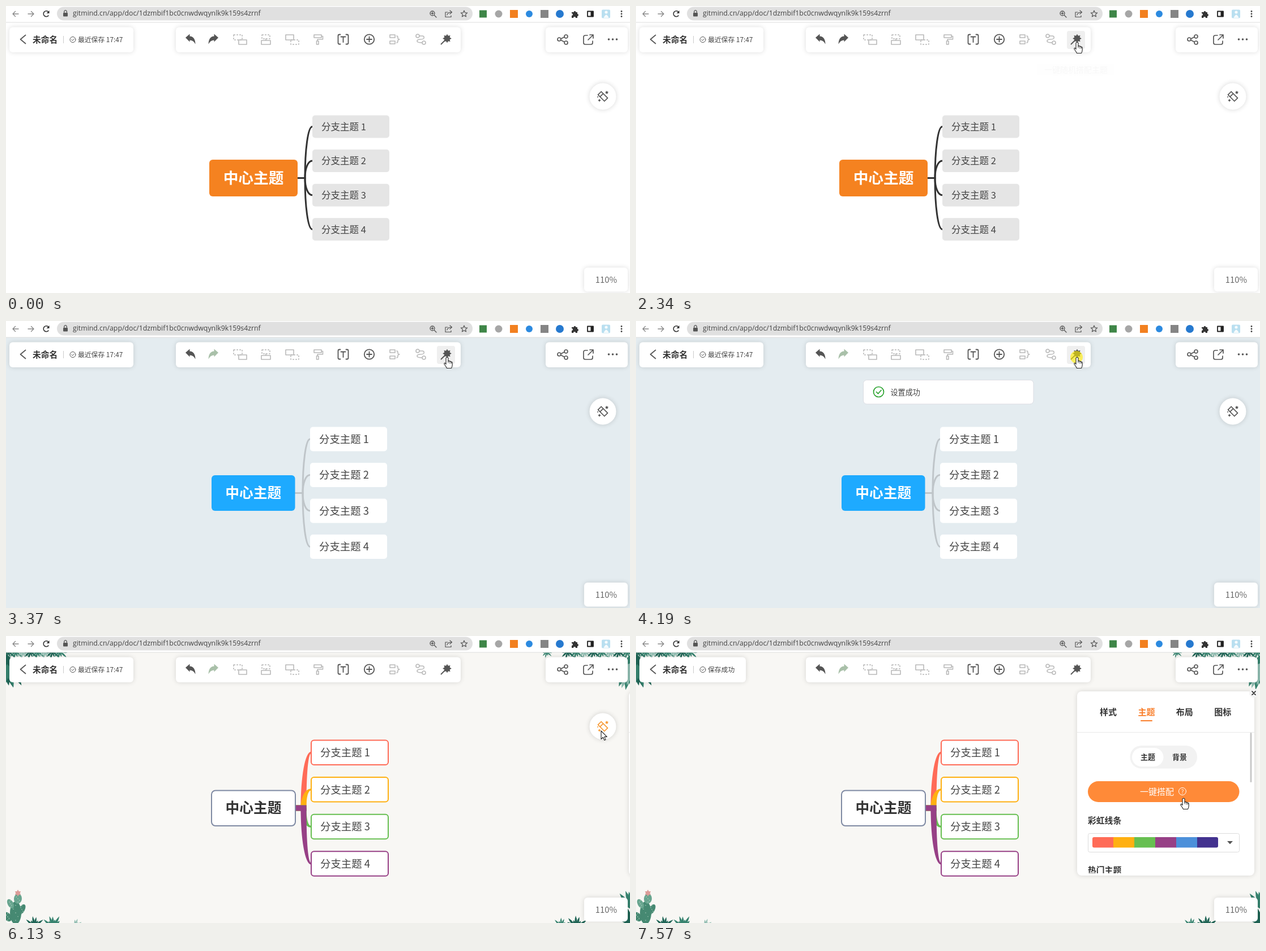
An HTML page with a canvas that plays this animation: 1102 by 508 pixels, repeating every 8000 ms.

```html
<!DOCTYPE html>
<html lang="zh">
<head>
<meta charset="utf-8">
<title>Mind map themes</title>
<style>
html, body { margin: 0; width: 100%; height: 100%; overflow: hidden; background: #fff; }
canvas { display: block; }
</style>
</head>
<body>
<canvas id="stage" width="1102" height="508"></canvas>
<script>
const ctx = document.getElementById('stage').getContext('2d');
const LOOP = 8000;
const CJK = '"Noto Sans CJK SC", "Noto Sans CJK", sans-serif';
const DARK = '#555', PALE = '#b9b9b9', ORANGE = '#ff8a38';
const RAINBOW = ['#ff6b57', '#ffb011', '#67bf51', '#974086', '#4c90da', '#43328f'];

// Bursts of activity: start, end, number of ticks
const BURSTS = [[260, 1040, 12], [1110, 1520, 6], [2270, 2830, 9], [3230, 3790, 9],
  [4190, 4680, 8], [4950, 5720, 12], [5780, 6550, 12], [6620, 7170, 8]];
const CLICKS = [2270, 3230, 4190];
const PATH = [[260, 720, 459], [1040, 776, 79], [1110, 778, 70], [1250, 779, 64], [4880, 779, 64],
  [4950, 779, 78], [5720, 1052, 212], [5990, 1051, 175], [6130, 1051, 168], [6480, 1051, 168], [7170, 967, 287]];

const THEMES = [
  { bg: '#fff', root: [359, 272, 156, 65, 6], fill: '#f58220', ink: '#fff', size: 26.7,
    x: 541, w: 136, h: 40, top: 193.5, gap: 60.6, r: 5, leaf: '#e5e5e5', font: 16.5, line: '#333', mid: 528 },
  { bg: '#fffdf0', root: [351, 273, 171, 63, { x: 24, y: 31 }], fill: '#80cc70', ink: '#fff', size: 24.7,
    x: 548.5, w: 152, h: 43, top: 187.5, gap: 63.5, r: { x: 18, y: 21.5 }, leaf: '#bbebaf', font: 18.4,
    line: '#80cc70', mid: 536, taper: true, pad: 24 },
  { bg: '#e4ecf0', root: [363, 273, 147.5, 63, 6], fill: '#1eaaff', ink: '#fff', size: 24.7,
    x: 537, w: 136, h: 43, top: 187.5, gap: 63.5, r: 5, leaf: '#fff', font: 18.4, line: '#bfc5c9', mid: 524 },
  { bg: '#f8f7f4', root: [363, 273.5, 148, 62.5, 7], fill: '#fff', ink: '#333', size: 24.7, border: '#7f8aa3',
    x: 539, w: 136, h: 43.5, top: 184.5, gap: 65.6, r: 5, leaf: '#fff', font: 18.4, lines: RAINBOW,
    mid: 525.5, taper: true }
];

const clamp = v => Math.max(0, Math.min(1, v));
const ease = v => { v = clamp(v); return v * v * (3 - 2 * v); };

function tick(t) {
  let held = 0;
  for (const [a, b, n] of BURSTS) {
    if (t < a) break;
    const d = (b - a) / (n - 1);
    held = a + Math.min(n - 1, Math.floor((t - a + 3) / d)) * d;
  }
  return t >= 7570 ? 7570 : held;
}

function box(x, y, w, h, r, fill, stroke, width = 1) {
  ctx.beginPath();
  ctx.roundRect(x, y, w, h, r);
  if (fill) { ctx.fillStyle = fill; ctx.fill(); }
  ctx.shadowColor = 'transparent';
  if (stroke) { ctx.strokeStyle = stroke; ctx.lineWidth = width; ctx.stroke(); }
}

function card(x, y, w, h, r = 6) {
  ctx.save();
  ctx.shadowColor = 'rgba(0,0,0,.14)';
  ctx.shadowBlur = 8;
  box(x, y, w, h, r, '#fff');
  ctx.restore();
}

function disc(x, y, r, fill) {
  ctx.fillStyle = fill;
  ctx.beginPath();
  ctx.arc(x, y, r, 0, 7);
  ctx.fill();
}

function text(s, x, y, size, color, weight = 400, align = 'left', family = CJK) {
  ctx.font = `${weight} ${size}px ${family}`;
  ctx.textAlign = align;
  ctx.textBaseline = 'middle';
  ctx.fillStyle = color;
  ctx.fillText(s, x, y);
}

function at(x, y, draw, angle = 0) {
  ctx.save();
  ctx.translate(x, y);
  ctx.rotate(angle);
  draw();
  ctx.restore();
}

function line(x, y, d, color = DARK, width = 1.6, dash = []) {
  at(x, y, () => {
    ctx.strokeStyle = color;
    ctx.lineWidth = width;
    ctx.lineCap = dash.length ? 'butt' : 'round';
    ctx.lineJoin = 'round';
    ctx.setLineDash(dash);
    ctx.stroke(new Path2D(d));
  });
}

function solid(x, y, d, color = DARK) {
  at(x, y, () => { ctx.fillStyle = color; ctx.fill(new Path2D(d)); });
}

const ring = (x, y, r) => `M${x + r} ${y}A${r} ${r} 0 1 1 ${x - r} ${y}A${r} ${r} 0 1 1 ${x + r} ${y}`;
const rect = (x, y, w, h) => `M${x} ${y}h${w}v${h}h${-w}z`;

function star(r, points, inner) {
  let d = '';
  for (let i = 0; i < points * 2; i++) {
    const a = i * Math.PI / points - Math.PI / 2, k = i % 2 ? r * inner : r;
    d += (i ? 'L' : 'M') + k * Math.cos(a) + ' ' + k * Math.sin(a);
  }
  return d + 'Z';
}

function browser() {
  box(0, 0, 1102, 29, 0, '#fff');
  box(0, 28.5, 1102, 1, 0, '#dedede');
  box(90, 1.5, 734, 24, 12, '#e0e0e0');
  line(17, 14, 'M5 0H-5M-.5-4.5L-5 0L-.5 4.5', '#888', 1.4);
  line(44, 14, 'M-5 0H5M.5-4.5L5 0L.5 4.5', '#888', 1.4);
  line(71, 14, 'M4 3A5 5 0 1 1 4-3.5', '#333', 1.6);
  solid(71, 14, 'M5.5-6V-1H.5Z', '#333');
  box(101, 12, 8, 6.5, 1, '#555');
  line(105, 11, 'M-2.3 1V-1A2.3 2.3 0 0 1 2.3-1V1', '#555', 1.3);
  text('gitmind.cn/app/doc/1dzmbif1bc0cnwdwqynlk9k159s4zrnf', 118, 14, 12.3, '#444', 400, 'left',
    '"Open Sans", "Noto Sans", sans-serif');
  line(753, 13, ring(0, 0, 4) + 'M3 3L7 7M-2 0H2M0-2V2', '#555', 1.3);
  line(782, 14, 'M-2-3H-6V5.5H4V3M-3 2Q-2-3 5-3M2-6L5.5-3L2 0', '#555', 1.2);
  line(809, 14, star(6, 5, .45), '#555', 1.2);
  box(836, 7.5, 13, 13, 0, '#3f8648');
  disc(870, 14, 6.5, '#a6a6a6');
  box(890, 7, 14, 14, 0, '#f28020');
  disc(924, 14, 6, '#2c8ae0');
  box(944, 7, 14, 14, 0, '#858585');
  disc(978, 14, 7, '#2679cf');
  solid(1005, 14, 'M-6-3H-2.5A2 2 0 1 1 1.5-3H4V0A2 2 0 1 1 4 4V7H1A2 2 0 0 0-3 7H-6V3A2 2 0 0 0-6-1Z', '#333');
  line(1032, 14, rect(-5, -4.5, 10, 9), '#222', 1.8);
  box(1032.5, 9, 5, 10, 0, '#222');
  box(1052, 6.5, 15, 15, 2, '#b9dff0');
  disc(1060, 11, 2.6, '#f6fbfd');
  solid(1060, 14, 'M-4.5 7Q0-4 4.5 7Z', '#f6fbfd');
  for (const y of [9.5, 14, 18.5]) disc(1087, y, 1.4, '#444');
}

// A spray of pointed leaves around one root, angles in radians
function spray(x, y, len, from, to, n, color) {
  for (let i = 0; i < n; i++) {
    const l = len * (.8 + .2 * Math.sin(i * 2.3)), w = len * .09;
    at(x, y, () => solid(0, 0, `M0 0Q${l * .5} ${-w * 2} ${l} 0Q${l * .5} ${w * 2} 0 0`, color),
      from + (to - from) * i / (n - 1));
  }
}

function jungle() {
  const deep = '#1f6455', mid = '#37836f', soft = '#8fbcb0';
  // Corners behind the cards
  spray(-6, 28, 72, .95, 1.5, 6, deep);
  spray(2, 50, 44, 1.1, 1.9, 5, mid);
  spray(1106, 30, 70, 1.65, 2.05, 5, mid);
  spray(1104, 48, 50, 1.75, 2.5, 5, soft);
  for (let i = 0; i < 8; i++) {
    const color = [deep, mid, soft][i % 3];
    spray(4 + i * 13, 27, 17, .2, 2.9, 6, color);
    spray(992 + i * 15, 27, 17, .2, 2.9, 6, color);
  }
  spray(955, 28, 12, .2, 2.9, 6, mid);
  // Bottom edge
  spray(50, 514, 20, -2.8, -.3, 8, deep);
  spray(83, 516, 23, -2.7, -.5, 9, mid);
  spray(122, 514, 15, -1.6, -.6, 4, soft);
  spray(980, 514, 17, -2.7, -.4, 7, mid);
  spray(1007, 516, 23, -2.6, -.3, 8, deep);
  spray(1106, 484, 38, -2.4, -1.6, 6, mid);
  spray(1106, 512, 40, -2.6, -1.7, 6, deep);
  const pads = [[17, 490, 10, 20, 0], [8, 474, 5, 9, -.5], [28, 484, 5, 10, .5], [21, 465, 7, 9, .1], [3, 497, 6, 9, -.6]];
  pads.forEach(([x, y, rx, ry, a], i) => {
    ctx.fillStyle = i % 2 ? '#68a58f' : '#468972';
    ctx.beginPath();
    ctx.ellipse(x, y, rx, ry, a, 0, 7);
    ctx.fill();
    for (let k = -2; k < 3; k++) disc(x + (k % 2) * rx * .4, y + k * ry * .33, .7, '#c3dccd');
  });
  solid(21, 455, star(6, 6, .6), '#dc9c98');
}

function gingham() {
  ctx.fillStyle = 'rgba(207,217,174,.25)';
  const p = 49;
  for (let x = -16; x < 1102; x += p) ctx.fillRect(x, 30, p / 2, 478);
  for (let y = 43; y < 508; y += p) ctx.fillRect(0, y, 1102, p / 2);
}

function branch(th, cy, color) {
  const { mid, x } = th, y0 = 304.5, dy = cy - y0;
  const end = th.root[0] + th.root[2];
  const arc = (a, y, back) => {
    const c1 = [a, y0 + dy * (back ? .65 : .55)], c2 = [a + (x - a) * .4, y];
    return back ? `C${c2} ${c1} ${a} ${y0}` : `C${c1} ${c2} ${x} ${y}`;
  };
  if (!th.taper) {
    line(0, 0, `M${end} ${y0}H${mid}` + arc(mid, cy), color, 3);
    return;
  }
  const a = mid - 5, b = mid + 5, s = dy < 0 ? -1.5 : 1.5;
  solid(0, 0, `M${a} ${y0}` + arc(a, cy + s) + `L${x} ${cy - s}` + arc(b, cy - s, true) + 'Z', color);
  box(end, y0 - 5, b - end, 10, 0, color);
}

function mindMap(th) {
  const rows = [0, 1, 2, 3].map(i => th.top + i * th.gap);
  const tone = i => th.lines ? th.lines[i] : th.line;
  rows.forEach((y, i) => branch(th, y + th.h / 2, tone(i)));
  box(...th.root, th.fill, th.border, 2);
  text('中心主题', th.root[0] + th.root[2] / 2, 304, th.size, th.ink, 700, 'center');
  rows.forEach((y, i) => {
    box(th.x, y, th.w, th.h, th.r, th.leaf, th.lines && tone(i), 2);
    text('分支主题 ' + (i + 1), th.x + (th.pad || 16), y + th.h / 2, th.font, '#444', 300);
  });
}

function toolbar(t, themed) {
  const status = t >= 6900 ? '保存成功' : t >= 6410 ? '保存中...' : '最近保存 17:47';
  card(6, 37.5, t >= 6410 ? 188 : 219, 44.5);
  line(30, 59, 'M4.5-7.5L-4.5 0L4.5 7.5', DARK, 1.7);
  text('未命名', 47, 59, 14.7, '#333', 700);
  box(101, 53, 1, 13, 0, '#ccc');
  line(118, 59.5, ring(0, 0, 5) + 'M-2.3 0L-.5 1.8L2.5-1.5', '#555', 1);
  text(status, 127, 59.5, 11.8, '#444');

  card(300, 37.5, 503, 44.5);
  if (t >= 1110 && t < 5000) box(761, 44, 32, 32, 4, '#efefef');
  const arrow = 'M-9-3L-1.5-9.5V-5.5Q8-5 8.5 8.5Q5 1.5-1.5 1.5V4.5Z';
  solid(326, 59, arrow);
  at(366, 59, () => { ctx.scale(-1, 1); solid(0, 0, arrow, themed ? '#a9c0a9' : DARK); });
  const dash = [3, 2];
  line(413, 59, rect(-11, -8, 15, 9), PALE, 1.5, dash);
  line(413, 59, rect(-2, 1, 14, 8), PALE, 1.6);
  line(459, 59, rect(-7, -8, 14, 7), PALE, 1.5, dash);
  line(459, 59, rect(-8, 2, 16, 7) + 'M0-1V2', PALE, 1.6);
  line(505, 59, rect(-11, -8, 14, 9), PALE, 1.6);
  line(505, 59, rect(-2, 1, 14, 8), PALE, 1.5, dash);
  line(551, 59, rect(-7, -8, 13, 5) + 'M6-5.5H8.5V0H-1V3M-2.5 3H1V9H-2.5Z', PALE, 1.6);
  line(595.5, 59, 'M-5-8.5H-7Q-9-8.5-9-6V6Q-9 8.5-7 8.5H-5M5-8.5H7Q9-8.5 9-6V6Q9 8.5 7 8.5H5M-4-4.5H4M0-4.5V5', DARK, 1.8);
  line(641.5, 59, ring(0, 0, 8.7) + 'M-4.5 0H4.5M0-4.5V4.5', DARK, 1.8);
  line(686, 59, rect(-8, -8, 9, 5) + rect(-8, 3, 9, 5) + 'M4-6Q6-6 6-3Q6 0 9 0Q6 0 6 3Q6 6 4 6', PALE, 1.6);
  line(732, 59, ring(-5, -6, 3) + ring(6, 6, 3) + 'M-2-6H3Q7-6 6-2Q5 0 0 0Q-6 0-6 3Q-6 6 3 6', PALE, 1.6);
  solid(779, 57.5, star(7.8, 8, .65));
  line(777, 59, 'M-2 2L-8.5 8.5', DARK, 1.8);

  card(953, 37.5, 145, 44.5);
  line(983, 59, ring(-6, 0, 3) + ring(6, -5, 3) + ring(6, 6, 3) + 'M-3-1L3-4M-3 1.5L3 4.5', DARK, 1.7);
  line(1028, 60, 'M-1-8H-5Q-8-8-8-5V5Q-8 8-5 8H5Q8 8 8 5V2M3-9H9V-3M9-9L0 0', DARK, 1.7);
  for (const x of [1064.5, 1071.5, 1078.5]) disc(x, 59, 1.8, DARK);
}

function magicButton(hot) {
  const color = hot ? '#f79a35' : DARK;
  ctx.save();
  ctx.shadowColor = 'rgba(0,0,0,.16)';
  ctx.shadowBlur = 8;
  disc(1054, 160, 23.5, '#fff');
  ctx.restore();
  at(1054, 160, () => {
    line(0, 0, 'M-4-8H4V8H-4ZM-4-3H4', color, 1.7);
  }, -.785);
  solid(1061, 153, star(3.3, 5, .5), color);
  solid(1048, 167, star(2.8, 4, .5), color);
  disc(1045, 161, 1, color);
}

function tooltip(t) {
  const alpha = clamp((t - 1110) / 340) * clamp((2343 - t) / 73);
  if (alpha <= 0) return;
  ctx.save();
  ctx.globalAlpha = alpha;
  card(699, 92, 156, 41, 4);
  solid(777, 92, 'M-6 .5L0-6L6 .5Z', '#fff');
  text('一键随机搭配主题', 777, 112.5, 14, '#444', 400, 'center');
  ctx.restore();
}

function toast(t) {
  const start = [4330, 3370, 2410].find(s => t >= s - 1);
  if (!start || t >= 5715) return;
  const p = ease((t - start) / 380) * (1 - ease((t - 5330) / 385));
  ctx.save();
  ctx.globalAlpha = p;
  ctx.translate(0, -43 * (1 - p));
  box(401.5, 104.5, 300.5, 42.5, 6, '#fff', '#dcdde3');
  line(428.5, 125.5, ring(0, 0, 9) + 'M-4 0L-1 3.2L4.5-3', '#2ba32f', 1.7);
  text('设置成功', 449.5, 126, 13.1, '#444');
  ctx.restore();
}

function panel(t) {
  if (t < 6125) return;
  ctx.save();
  ctx.translate(321 * (1 - ease((t - 6130) / 420)), 0);
  card(779, 98, 313, 326, 8);
  ['样式', '主题', '布局', '图标'].forEach((s, i) =>
    text(s, 834 + i * 67.4, 134.5, 15, i === 1 ? '#f97f2c' : '#333', 700, 'center'));
  box(891, 149, 21, 2, 1, '#f97f2c');
  box(779, 170, 313, 1, 0, '#e8e8e8');
  box(1084.5, 171, 3, 88, 1.5, '#c9c9c9');
  box(872.5, 194, 118.5, 40.5, 20, '#f2f2f2');
  box(876, 198, 55.5, 33, 16.5, '#fff');
  text('主题', 904, 214.5, 13, '#333', 700, 'center');
  text('背景', 960, 214.5, 13, '#333', 700, 'center');
  box(798, 257, 267.5, 37, 18.5, ORANGE);
  text('一键搭配', 890, 275, 15, '#fff');
  line(965, 275, ring(0, 0, 6.5), '#fff', 1);
  text('?', 965, 275, 10, '#fff', 400, 'center');
  text('彩虹线条', 798, 326.5, 14.8, '#333', 700);
  box(798.5, 349.5, 267, 33, 3, '#fff', '#dcdcdc');
  ctx.save();
  ctx.beginPath();
  ctx.roundRect(806, 356, 222, 18.5, 3);
  ctx.clip();
  RAINBOW.forEach((c, i) => box(806 + i * 37, 356, 37.5, 19, 0, c));
  ctx.restore();
  solid(1049, 365.5, 'M-5-2.5H5L0 3Z', '#555');
  ctx.save();
  ctx.beginPath();
  ctx.rect(779, 400, 313, 20);
  ctx.clip();
  text('热门主题', 798, 414, 14.8, '#333', 700);
  ctx.restore();
  disc(1091, 101, 8, '#f4f4f4');
  line(1091, 101, 'M-3-3L3 3M3-3L-3 3', '#222', 1.7);
  ctx.restore();
}

function pointer(t) {
  if (t < 255) return;
  let [, x, y] = PATH[PATH.length - 1];
  for (let i = 1; i < PATH.length; i++) {
    const [t0, x0, y0] = PATH[i - 1], [t1, x1, y1] = PATH[i];
    if (t > t1) continue;
    const p = ease((t - t0) / (t1 - t0));
    x = x0 + (x1 - x0) * p;
    y = y0 + (y1 - y0) * p;
    break;
  }
  if (CLICKS.some(c => t >= c - 1 && t < c + 65)) disc(778, 64, 11, 'rgba(255,238,0,.62)');
  const hand = (t >= 1110 && t < 5000) || t >= 7570;
  const shape = hand
    ? 'M-2 1.5Q0-1 2 1.5V7Q4 6 5 7.5Q7 7 7.5 8.5Q9.2 8.2 9.2 10V14Q9 17 7.5 19.5H-.5Q-2.5 15.5-5 12.5Q-5.5 10-3.5 10.5L-2 12.5Z'
    : 'M0 0V14.5L3.4 11.3L5.8 16.4L8 15.4L5.8 10.4H10.3Z';
  solid(x, y, shape, '#fff');
  line(x, y, shape, '#222', 1.1);
  if (hand) line(x, y, 'M2 7V10M5 8V11M7.5 9V11', '#222', .9);
}

function draw(t) {
  const k = CLICKS.filter(c => t >= c + 139).length;
  const th = THEMES[k];
  box(0, 0, 1102, 508, 0, th.bg);
  if (k === 1) gingham();
  if (k === 3) jungle();
  mindMap(th);
  browser();
  toolbar(t, k > 0);
  card(1021, 463, 77, 42.5);
  text('110%', 1060, 484.5, 14.8, '#666', 400, 'center');
  magicButton(t >= 5985);
  tooltip(t);
  toast(t);
  panel(t);
  pointer(t);
}

const began = performance.now();
function loop() {
  draw(tick((performance.now() - began) % LOOP));
  requestAnimationFrame(loop);
}
loop();
</script>
</body>
</html>
```
